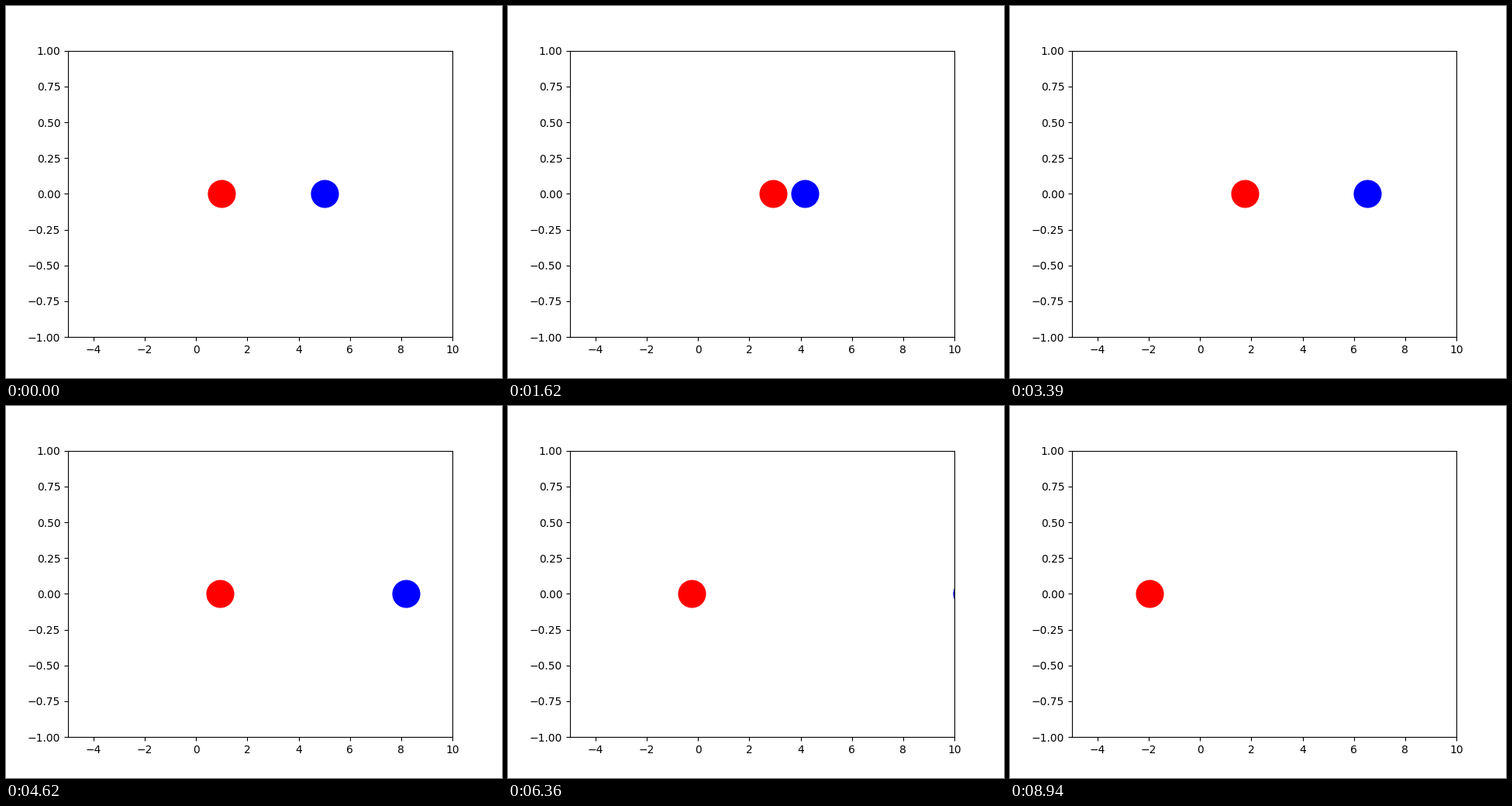
A matplotlib script for the animation above (9000 ms loop, 640 px wide and 480 px high).

```python
import math

import matplotlib.pyplot as plt
from matplotlib.animation import FuncAnimation

FRAMES = 300
DT = 6 / (FRAMES - 1)
X1, X2 = 1, 5      # starting positions
V1, V2 = 2, -1     # starting velocities
CONTACT = 1        # gap between centres at which the balls bounce

# first whole step at which the balls touch
HIT = math.ceil((X2 - X1 - CONTACT) / (V1 - V2) / DT)

fig, ax = plt.subplots(figsize=(6.4, 4.8), dpi=100)
ax.set_xlim(-5, 10)
ax.set_ylim(-1, 1)
red, = ax.plot([X1], [0], "ro", markersize=25)
blue, = ax.plot([X2], [0], "bo", markersize=25)


def position(x, v_in, v_out, step):
    before = min(step, HIT)
    return x + (v_in * before + v_out * (step - before)) * DT


def update(step):
    # equal masses swap velocities in an elastic collision
    red.set_data([position(X1, V1, V2, step)], [0])
    blue.set_data([position(X2, V2, V1, step)], [0])
    return red, blue


anim = FuncAnimation(fig, update, frames=FRAMES, interval=30,
                     repeat=True, repeat_delay=0, blit=False)
plt.show()
```
